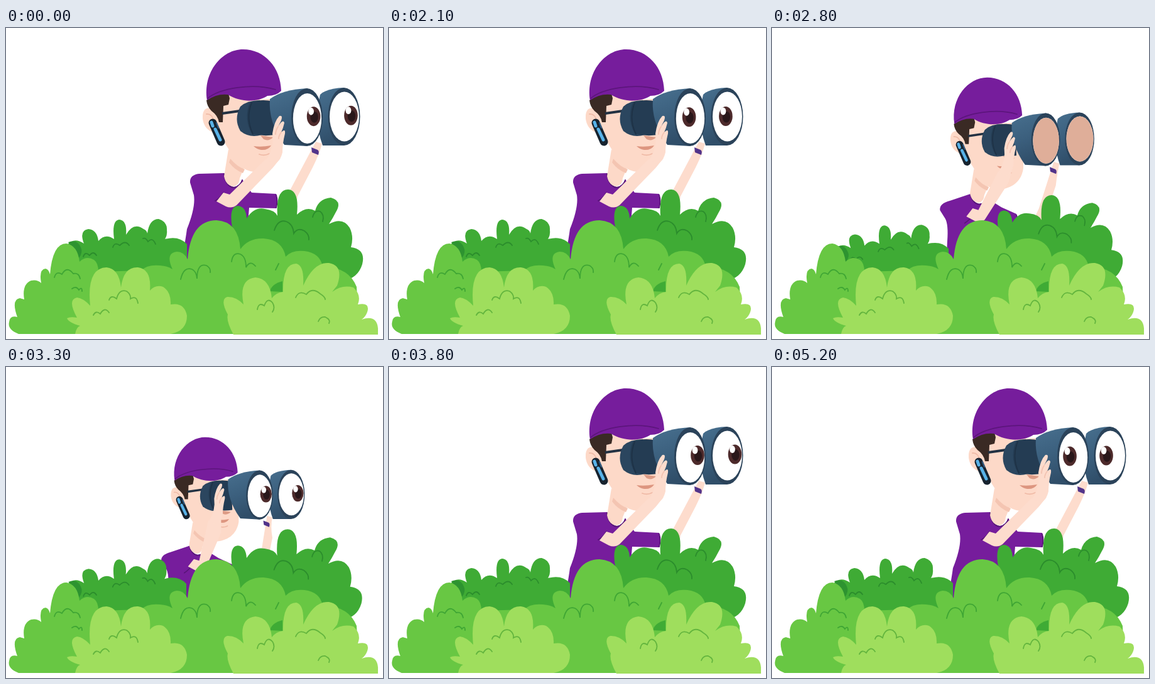
Animation of 600 by 495 pixels, one loop 5.5 s. Source, as an HTML page:

```html
<!DOCTYPE html>
<html lang="en">
<head>
<meta charset="utf-8">
<title>Lookout in the bushes</title>
<style>
html, body { margin: 0; width: 100%; height: 100%; overflow: hidden; background: #fff; }
svg { display: block; width: 100vw; height: 100vh; }
.line { fill: none; stroke-width: 1.8; stroke-linecap: round; }
</style>
</head>
<body>
<svg viewBox="0 0 600 495" preserveAspectRatio="none">
  <defs>
    <linearGradient id="barrel" x1="0" y1="0" x2="0.25" y2="1">
      <stop offset="0" stop-color="#48708f"/>
      <stop offset="0.55" stop-color="#3b5f7d"/>
      <stop offset="1" stop-color="#304e69"/>
    </linearGradient>
    <clipPath id="lidClip"><rect id="lidBox" x="450" y="100" width="120" height="0"/></clipPath>
    <g id="iris">
      <ellipse rx="10.8" ry="15.5" fill="#4d2a2b"/>
      <ellipse cx="1" cy="1" rx="6.2" ry="9" fill="#29171a"/>
      <ellipse cx="-4" cy="-8" rx="4.4" ry="6" fill="#fff"/>
    </g>
  </defs>

  <g id="man">
    <path id="farArm" fill="#fddccd"/>
    <path d="M486,190 L496,194 Q499,196 497,202 L487,198Z" fill="#51338a"/>

    <path id="torso" fill="#761d9c"/>
    <path id="seam" class="line" stroke="#571577"/>

    <!-- neck, face, ear -->
    <path d="M354,193 L347,236 Q350,251 362,252 Q371,251 372,239 L379,222Z" fill="#fdd9c8"/>
    <path d="M357,208 Q368,221 380,225 L377,231 Q364,226 355,214Z" fill="#f4c5b2"/>
    <path d="M338,130 L356,107 L400,114 L440,112 L440,192 Q437,214 418,224 Q397,234 379,224 Q359,211 355,194 L340,170Z" fill="#fdd9c8"/>
    <path d="M329,128 Q312,124 313,144 Q315,162 332,167 L344,160 L342,138Z" fill="#fdd9c8"/>
    <path d="M319,137 Q328,136 331,149" class="line" stroke="#efbba7"/>
    <path d="M394,188 Q406,190 422,187 Q417,195 406,194 Q399,193 394,188Z" fill="#dd9680"/>
    <path d="M403,201 Q411,204 419,200" class="line" stroke="#efb9a5"/>
    <path d="M405,171 L425,174 Q418,181 410,177Z" fill="#dd9b85"/>
    <path d="M319,115 Q335,103 354,104 L356,112 L354,122 L346,124 L345,150 L339,150 Q337,139 327,132 Q320,125 319,115Z" fill="#3a2a24"/>
    <path d="M344,136 L372,132" stroke="#233243" stroke-width="4"/>
    <path d="M329,151 L342,181" stroke="#17232f" stroke-width="13" stroke-linecap="round"/>
    <path d="M327,150 L329,156 M333,161 L341,178" stroke="#58b2e8" stroke-width="5" stroke-linecap="round"/>
    <path d="M335,151 L338,159" stroke="#34618a" stroke-width="2" stroke-linecap="round"/>

    <!-- cap -->
    <path d="M320,115 C313,70 344,34 377,34 C412,34 437,63 438,100 Q430,108 416,108 C401,118 374,119 353,106 Q336,104 320,115Z" fill="#761d9c"/>
    <path d="M321,112 C340,96 392,87 429,98" class="line" stroke="#5c157c"/>

    <!-- binoculars -->
    <path d="M500,106 Q510,96 538,95 L538,187 L504,187 Q490,150 500,106Z" fill="url(#barrel)"/>
    <ellipse cx="538" cy="141" rx="25.5" ry="46" fill="#2b435a"/>
    <ellipse cx="538.5" cy="141" rx="23.5" ry="39.5" fill="#fff"/>
    <path d="M373,125 Q384,115 404,115 L407,170 Q388,176 373,164 Q362,145 373,125Z" fill="#2b465f"/>
    <path d="M388,119 Q406,112 426,117 L428,170 Q408,173 391,168 Q378,144 388,119Z" fill="#243c53"/>
    <path d="M391,119 Q381,144 393,169" class="line" stroke="#1e3246"/>
    <path d="M420,113 Q440,98 480,96 L480,188 L443,186 Q417,150 420,113Z" fill="url(#barrel)"/>
    <ellipse cx="479" cy="142" rx="25" ry="46" fill="#2b435a"/>
    <ellipse cx="479.5" cy="144" rx="22.7" ry="40" fill="#fff"/>
    <use id="nearIris" href="#iris"/>
    <use id="farIris" href="#iris"/>
    <g clip-path="url(#lidClip)" fill="#dfae99">
      <ellipse cx="479.5" cy="144" rx="22.7" ry="40"/>
      <ellipse cx="538.5" cy="141" rx="23.5" ry="39.5"/>
    </g>

    <!-- near arm -->
    <path id="nearArm" fill="#fddccd"/>
    <g id="hand">
      <path d="M424,168 Q427,148 435,140 Q441,138 438,147 L433,157 Q441,144 443,151 Q441,160 438,166 Q445,159 444,168 Q440,184 440,198 Q437,212 427,216 L414,210 Q427,190 424,168Z" fill="#fddccd"/>
      <path d="M433,157 Q429,163 429,169 M438,166 Q434,171 434,176" class="line" stroke="#f2c3b1" stroke-width="1"/>
    </g>
  </g>

  <g id="backLeft">
    <path fill="#3fab35" d="M90,405 L97,346 Q108,332 124,343 Q116,322 131,320 Q145,321 147,339 Q158,326 172,336 Q168,305 181,305 Q193,307 191,329 Q203,308 219,320 Q224,322 225,327 Q228,304 243,304 Q257,308 256,322 Q257,330 253,336 Q275,330 288,344 L288,405Z"/>
    <path fill="#2d9330" d="M99,341 Q113,335 119,349 Q123,357 116,366Z"/>
    <path class="line" stroke="#2b8d2c" d="M170,349 Q173,340 181,346 Q190,337 196,346 M218,335 Q222,333 226,340 Q233,332 238,344 M123,364 Q126,355 133,362 Q139,354 144,362"/>
  </g>
  <g id="backRight">
    <path fill="#3fab35" d="M365,340 Q350,284 369,283 Q382,284 383,303 Q395,284 412,288 Q428,290 432,299 Q429,257 449,257 Q467,258 463,297 Q478,283 492,291 Q497,272 517,270 Q536,275 525,293 Q520,303 514,312 Q536,300 547,318 Q554,332 549,349 Q573,352 567,376 Q560,399 536,402 L380,402Z"/>
    <path class="line" stroke="#2b8d2c" d="M427,322 Q433,304 446,308 Q457,312 458,327 Q464,317 475,323 Q483,329 482,337 M488,301 Q491,289 500,292 Q507,297 504,308"/>
  </g>

  <path fill="#68c743" d="M20,487 Q2,480 5,468 Q6,457 18,460 Q8,432 22,430 L29,432 Q25,408 40,402 Q50,400 56,406 Q52,384 63,383 Q68,384 70,392 Q74,343 96,343 Q114,346 117,372 Q128,362 140,369 Q147,374 147,388 L215,386 Q225,376 245,378 Q258,379 265,384 Q253,358 272,356 Q283,356 289,368 Q294,306 335,306 Q370,308 373,352 Q386,334 410,335 Q440,337 445,364 Q455,353 475,355 Q500,358 504,380 Q545,380 558,412 L562,487Z"/>
  <path fill="#3fab35" d="M420,419 Q423,407 440,403 L440,420Z"/>
  <path class="line" stroke="#3fa634" d="M278,400 Q283,379 296,384 Q303,387 304,399 Q304,374 319,378 Q326,382 325,389 M359,372 Q361,356 373,360 Q382,364 382,381 Q388,369 397,379 M429,385 L434,375 M77,397 Q80,386 89,392 Q97,378 107,391 Q116,389 118,399 M105,415 Q112,410 116,417 Q121,411 121,419"/>

  <path fill="#9fde5d" d="M110,487 Q112,476 118,474 Q100,469 97,462 Q102,459 113,461 Q97,432 113,429 Q123,430 134,442 Q128,382 160,381 Q180,383 183,413 Q187,380 210,381 Q232,384 229,418 Q238,408 250,412 Q263,420 262,440 Q284,436 288,458 Q288,482 262,487Z"/>
  <path fill="#9fde5d" d="M362,488 Q350,466 353,456 Q340,432 352,428 Q366,427 378,440 Q370,400 397,397 Q420,399 423,430 Q430,421 441,420 Q440,375 462,375 Q475,378 473,410 Q490,372 514,374 Q538,378 527,410 L519,420 Q535,408 553,413 Q566,425 560,440 Q580,436 575,452 Q572,460 566,464 Q590,456 592,478 L592,488Z"/>
  <path class="line" stroke="#63b53e" d="M164,433 Q167,424 176,431 Q180,415 192,419 Q199,424 198,431 Q208,425 210,438 M139,457 Q143,449 150,455 Q157,443 164,453 M400,448 Q402,436 411,442 Q416,428 424,437 Q429,445 424,452 M461,429 Q466,417 478,424 Q487,412 500,423 Q508,428 508,432 M497,467 Q500,459 508,460 Q517,464 514,470"/>
</svg>
<script>
const LOOP = 5500, STEP = 100;
const $ = id => document.getElementById(id);
const clamp = x => Math.max(0, Math.min(1, x));
const mix = (a, b, k) => a + (b - a) * k;
const ease = p => p < 0.5 ? 4 * p ** 3 : 1 - (2 - 2 * p) ** 3 / 2;
const ramp = (t, from, to) => ease(clamp((t - from) / (to - from)));
const bump = (t, a, b, c, d) => ramp(t, a, b) - ramp(t, c, d);
const set = (id, name, value) => $(id).setAttribute(name, value);

// Blend two paths that have the same commands.
function morph(a, b, k) {
  const ends = b.match(/\d+/g);
  let i = 0;
  return a.replace(/\d+/g, n => mix(+n, +ends[i++], k).toFixed(2));
}

const scaleAt = (x, y, s) => `translate(${x * (1 - s)} ${y * (1 - s)}) scale(${s})`;

const TORSO = [
  "M293,246 Q292,234 307,232 L347,231 Q350,252 363,253 Q372,251 376,241 L391,262 L430,264 Q433,275 430,287 L387,286 L382,345 L364,420 L270,420 Q284,350 288,320 Q302,285 299,266Z",
  "M295,266 Q293,254 313,249 L348,237 Q352,252 363,254 Q373,253 378,245 L402,260 L428,272 Q432,283 430,296 L402,300 L392,345 L364,420 L296,420 Q307,365 308,320 Q310,290 304,280Z"
];
const SEAM = [
  "M347,232 Q350,253 363,254 Q373,252 376,242 M333,275 Q341,271 346,262 M430,266 Q433,275 430,286",
  "M348,238 Q352,254 363,255 Q374,254 378,246 M338,288 Q347,282 352,274 M428,274 Q432,283 430,295"
];

function draw(t) {
  const duck = bump(t, 2500, 3070, 3290, 3600);
  const slump = clamp(duck * 1.7);
  const squash = 1 - 0.05 * bump(t, 2500, 2800, 2900, 3500);
  const gaze = 1 - ramp(t, -190, 500) + ramp(t, 1980, 2300) - ramp(t, 4250, 4800);
  const blink = bump(t, 650, 760, 800, 900) + bump(t, 2600, 2750, 2850, 3000);

  set("man", "transform", scaleAt(-24, 553, 1 - 0.15 * duck));
  set("torso", "d", morph(TORSO[0], TORSO[1], slump));
  set("seam", "d", morph(SEAM[0], SEAM[1], slump));

  const fx = 30 * duck;
  set("farArm", "d", `M493,181 L503,184 Q499,200 ${488 + fx * 0.5},222 L${464 + fx},268 L${458 + fx},300 L${432 + fx},300 L${450 + fx},262Z`);

  const hx = -30 * duck, hy = -19 * duck, ex = 10 * duck;
  set("hand", "transform", `translate(${hx} ${hy})`);
  set("nearArm", "d", `M${413 + hx},${209 + hy} L${437 + hx},${207 + hy} L${425 + hx * 0.6},${222 + hy * 0.5} L${367 + ex},282 Q${359 + ex},288 ${350 + ex},284 L${335 + ex},276 L${346 + ex},262 L${356 + ex},265Z`);

  set("nearIris", "transform", `translate(${mix(474, 491, gaze)} ${mix(142, 140.5, gaze)})`);
  set("farIris", "transform", `translate(${mix(532, 550.5, gaze)} ${mix(141, 139, gaze)})`);
  set("lidBox", "height", Math.max(0, 86 * blink));

  set("backLeft", "transform", scaleAt(150, 488, squash));
  set("backRight", "transform", scaleAt(370, 435, squash));
}

const start = performance.now();
function tick() {
  const t = (performance.now() - start) % LOOP;
  draw(Math.floor(t / STEP) * STEP);
  requestAnimationFrame(tick);
}
tick();
</script>
</body>
</html>
```
